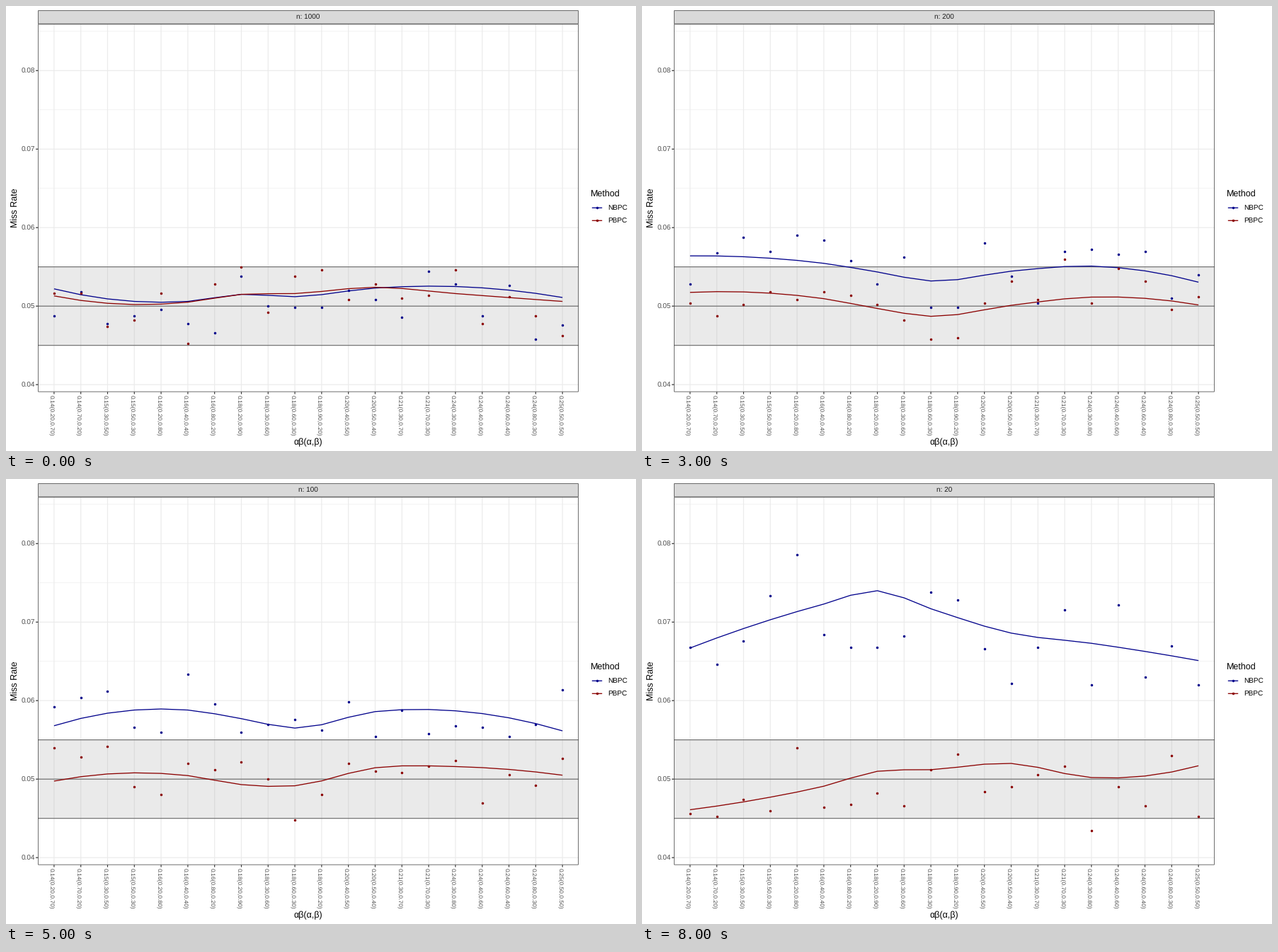
Write a matplotlib script that moves like this. It is 890x629 px and loops after 9 s.

```python
import numpy as np
import matplotlib.pyplot as plt
from matplotlib.animation import FuncAnimation
from matplotlib.patches import Rectangle

W, H, DPI = 890, 629, 100
LEFT, RIGHT, TOP, BOTTOM = 45.2, 808.8, 25.5, 545.5
STRIP_TOP = 6.2
Y_MIN, Y_MAX = 390.7, 859.3          # rates in units of 1e-4
COLORS = {"NBPC": "#00008b", "PBPC": "#8b0000"}
SIZES = [1000, 500, 250, 200, 150, 100, 75, 50, 20]

# Key points of the two smooth curves (NBPC, PBPC) at a few columns
COLS = [1, 4, 6, 8, 10, 13, 16, 20]
TRENDS = {
    1000: ([522, 506, 506, 515, 512, 523, 525, 511],
           [513, 502, 505, 515, 516, 524, 516, 506]),
    250: ([562, 562, 555, 541, 518, 524, 541, 526],
          [529, 528, 517, 498, 473, 485, 510, 507]),
    150: ([566, 560, 554, 546, 546, 565, 561, 535],
          [506, 505, 502, 496, 501, 517, 513, 496]),
    75: ([570, 616, 622, 608, 584, 607, 613, 588],
         [489, 511, 507, 490, 482, 512, 519, 514]),
    50: ([663, 650, 650, 657, 654, 638, 629, 617],
         [513, 511, 511, 512, 518, 519, 513, 501]),
    20: ([667, 703, 723, 740, 717, 686, 673, 651],
         [461, 477, 491, 510, 512, 520, 502, 517]),
}

# All (alpha, beta) pairs with a product from 0.14 to 0.25
PAIRS = sorted(((a, b) for a in range(2, 10) for b in range(2, 10)
                if 14 <= a * b <= 25),
               key=lambda p: (p[0] * p[1], p[0]))
X = np.arange(1, len(PAIRS) + 1)


def trend(i):
    """Key points for one sample size; gaps take their neighbours' mean."""
    if SIZES[i] in TRENDS:
        return np.array(TRENDS[SIZES[i]], float)
    return (trend(i - 1) + trend(i + 1)) / 2


def smooth(keys):
    """Cubic Hermite curve through the key points, at every column."""
    cols = np.array(COLS, float)
    slope = np.gradient(keys, cols, edge_order=2)
    i = np.clip(np.searchsorted(cols, X) - 1, 0, None)
    step = cols[i + 1] - cols[i]
    t = (X - cols[i]) / step
    blend = t * t * (3 - 2 * t)
    bend = slope[i] * (1 - t) - slope[i + 1] * t
    return keys[i] * (1 - blend) + keys[i + 1] * blend + step * t * (1 - t) * bend


def scatter(curves, rng):
    """Binomial scatter of 5000 runs, partly shared by both methods."""
    p = curves / 1e4
    spread = 1e4 * np.sqrt(p * (1 - p) / 5000)
    noise = 0.8 * rng.normal(size=X.size) + 0.6 * rng.normal(size=curves.shape)
    return np.clip(2 * np.round((curves + spread * noise) / 2), 412, 838)


rng = np.random.default_rng(7)
CURVES = [np.array([smooth(k) for k in trend(i)]) for i in range(len(SIZES))]
POINTS = [scatter(c, rng) for c in CURVES]


def px(col):
    return LEFT + (np.asarray(col) - 0.4) * (RIGHT - LEFT) / 20.2


def py(rate):
    return BOTTOM - (np.asarray(rate) - Y_MIN) * (BOTTOM - TOP) / (Y_MAX - Y_MIN)


def pt(pixels):
    return pixels * 72 / DPI


plt.rcParams["font.family"] = "Liberation Sans"
plt.rcParams["text.hinting"] = "none"
fig = plt.figure(figsize=(W / DPI, H / DPI), dpi=DPI, facecolor="white")
ax = fig.add_axes([0, 0, 1, 1])
ax.set_xlim(0, W)
ax.set_ylim(H, 0)
ax.axis("off")


def line(xs, ys, color, width, z=1):
    return ax.plot(xs, ys, color=color, lw=pt(width), zorder=z, snap=False,
                   solid_capstyle="butt")[0]


def dots(xs, ys, color):
    return ax.plot(xs, ys, "o", color=color, ms=pt(3.5), mew=0, zorder=6,
                   snap=False)[0]


def box(x0, y0, x1, y1, z, **style):
    ax.add_patch(Rectangle((x0, y0), x1 - x0, y1 - y0, zorder=z, snap=False,
                           **style))


def frame(y0, y1, fill):
    """Box whose border lies fully inside its edges."""
    box(LEFT + 0.35, y0 + 0.35, RIGHT - 0.35, y1 - 0.35, 7, fc=fill,
        ec="#333333", lw=pt(0.7))


def label(x, y, text, size, color="black", ha="left", angle=0):
    return ax.text(x, y, text, fontsize=pt(size), color=color, ha=ha,
                   va="baseline", rotation=angle, rotation_mode="anchor",
                   zorder=9)


# Grid, ticks and tick labels
for rate in range(450, 851, 100):
    line([LEFT, RIGHT], [py(rate)] * 2, "#ebebeb", 0.6)
for rate in range(400, 801, 100):
    y = py(rate)
    line([LEFT, RIGHT], [y, y], "#ebebeb", 1.2)
    line([LEFT - 3.1, LEFT], [y, y], "#333333", 1.2)
    label(40.7, y + 3.6, f"{rate / 1e4:.2f}", 10, "#4d4d4d", "right")
for x, (a, b) in zip(px(X), PAIRS):
    line([x, x], [TOP, BOTTOM], "#ebebeb", 1.2)
    line([x, x], [BOTTOM, BOTTOM + 3.1], "#333333", 1.2)
    label(x - 6.1, 550, f"{a * b / 100:.2f}({a / 10:.2f},{b / 10:.2f})",
          8.5, "#4d4d4d", angle=270)

# Tolerance band
box(LEFT, py(550), RIGHT, py(450), 2, fc="0.6", alpha=0.2, lw=0)
for rate in (450, 500, 550):
    line([LEFT, RIGHT], [py(rate)] * 2, "#666666", 1.1, 3)

# Panel frame and strip
frame(TOP, BOTTOM, "none")
frame(STRIP_TOP, TOP, "#d9d9d9")
mid_x, mid_y = (LEFT + RIGHT) / 2, (TOP + BOTTOM) / 2
strip = label(mid_x, 19.3, "", 10, "#1a1a1a", "center")

# Titles and legend
label(15.6, mid_y, "Miss Rate", 12.5, ha="center", angle=90)
label(mid_x, 620.7, "αβ(α,β)", 12.5, ha="center")
label(826, 268.7, "Method", 12.5)
for i, (name, color) in enumerate(COLORS.items()):
    y = 285.3 + 18 * i
    line([827.8, 842.2], [y, y], color, 1.3)
    dots([835], [y], color)
    label(850.3, y + 3.6, name, 10)

lines = [line([], [], c, 1.3, 5) for c in COLORS.values()]
clouds = [dots([], [], c) for c in COLORS.values()]


def draw(k):
    strip.set_text(f"n: {SIZES[k]}")
    for artists, rates in ((lines, CURVES[k]), (clouds, POINTS[k])):
        for artist, row in zip(artists, rates):
            artist.set_data(px(X), py(row))
    return [strip, *lines, *clouds]


anim = FuncAnimation(fig, draw, frames=len(SIZES), interval=1000, repeat=True,
                     repeat_delay=0, blit=False)
plt.show()
```
